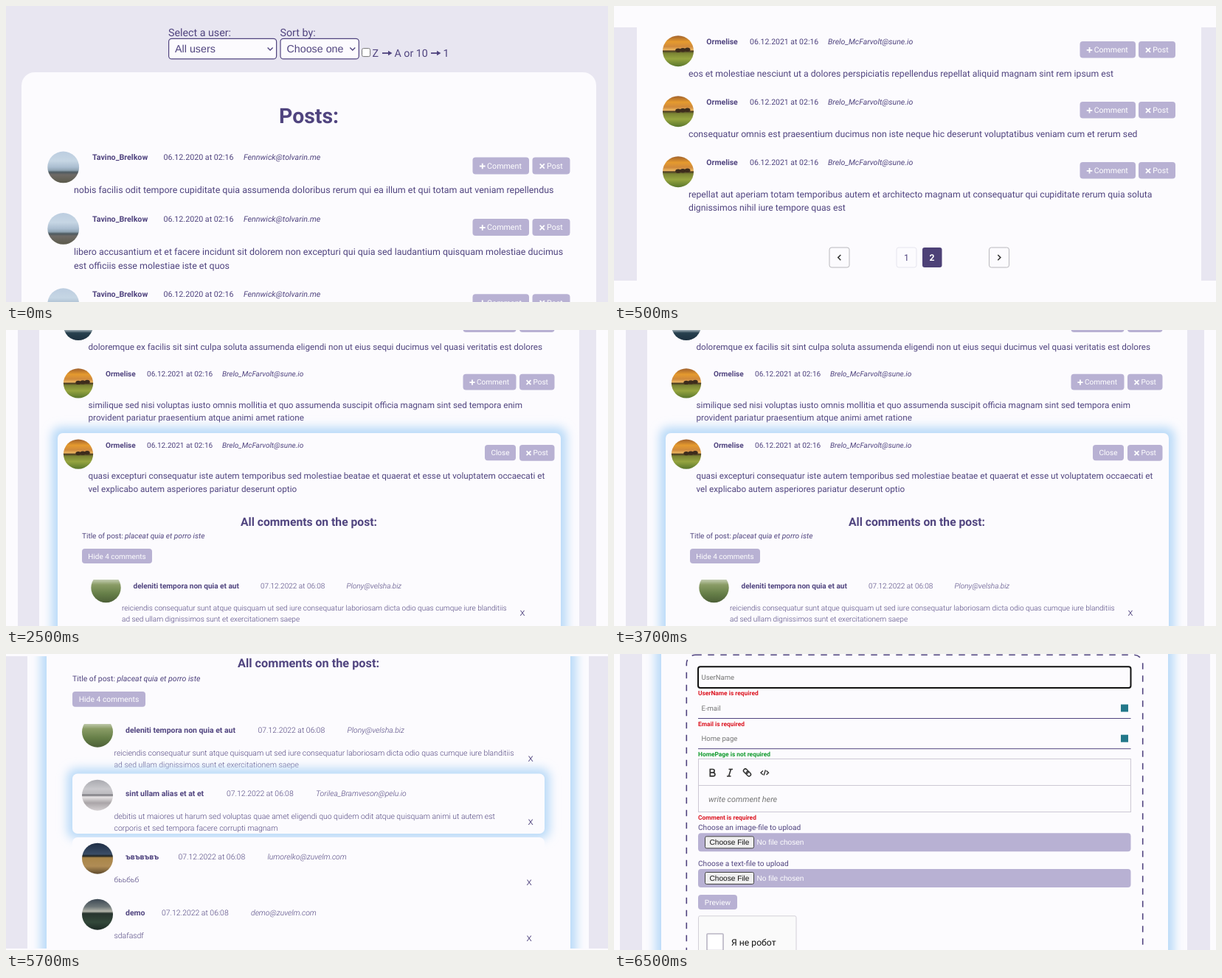
Animation, 816 px wide and 402 px high, one loop 8000 ms. Source, as an HTML page:

```html
<!DOCTYPE html>
<html lang="en">
<head>
<meta charset="utf-8">
<title>Posts and comments</title>
<style>
html, body { margin: 0; width: 100%; height: 100%; overflow: hidden; background: #fcfbfe; }
svg { display: block; width: 816px; height: 402px; }
text { font-family: Roboto, sans-serif; fill: #50447f; white-space: pre; text-rendering: geometricPrecision; }
.b { font-weight: 700; }
.i { font-style: italic; }
.l { font-weight: 300; }
.m { text-anchor: middle; }
.w { fill: #fff; }
.a { font-family: "Liberation Sans", Arial, sans-serif; }
.gray { fill: #757575; }
.red { fill: #dc1420; }
.green { fill: #0f9a2b; }
.black { fill: #111; }
</style>
</head>
<body>
<svg id="stage" viewBox="0 0 816 402">
  <defs>
    <filter id="blur" x="-20%" y="-50%" width="140%" height="200%"><feGaussianBlur stdDeviation="6.5"/></filter>
  </defs>
</svg>
<script>
const PANEL = '#fcfbfe', LILAC = '#e8e6f1', INK = '#50447f', BUTTON = '#b8b1d3', GLOW = '#b9daf8';
const stage = document.getElementById('stage');

const rect = (x, y, w, h, fill, r = 0, more = '') =>
  `<rect x="${x}" y="${y}" width="${w}" height="${h}" rx="${r}" fill="${fill}" ${more}/>`;
const box = (x, y, w, h, line, fill = PANEL, r = 3, sw = 1) =>
  rect(x, y, w, h, fill, r, `stroke="${line}" stroke-width="${sw}"`);
const text = (x, y, size, str, cls = '') =>
  `<text x="${x}" y="${y}" font-size="${size}" class="${cls}">${str}</text>`;
const path = (d, color = INK, sw = 1.5, fill = 'none') =>
  `<path d="${d}" stroke="${color}" stroke-width="${sw}" fill="${fill}"/>`;
const glowCard = (x, y, w, h, spread = 8) =>
  rect(x - spread, y - spread, w + 2 * spread, h + 2 * spread, GLOW, 12, 'filter="url(#blur)"') +
  rect(x, y, w, h, PANEL, 7);

// Avatars: soft landscapes as [offset, colour] stops
const scenery = {
  sky: [[0, '#bccde0'], [.3, '#c6d6e4'], [.5, '#aabdd0'], [.6, '#8fa3b2'], [.66, '#4d5a60'], [.74, '#6e6a66'], [1, '#5b5a4b']],
  sunset: [[0, '#a0602c'], [.2, '#e59a2e'], [.36, '#d08a3c'], [.46, '#ecb560'], [.5, '#4b3b22'], [.57, '#7b8434'], [.75, '#96a540'], [1, '#59762c']],
  snow: [[0, '#6fa3bd'], [.6, '#dfe8ec'], [.75, '#27404e'], [1, '#1d3140']],
  wheat: [[0, '#dfe6e2'], [.26, '#b9c4a4'], [.4, '#8a9c66'], [.7, '#667f48'], [1, '#4d6038']],
  shore: [[0, '#a9a9af'], [.3, '#c9c8cc'], [.45, '#bdbcc0'], [.5, '#77767c'], [.56, '#e6e3e4'], [.75, '#aaa5a8'], [1, '#d4d0d2']],
  harvest: [[0, '#1f2e46'], [.36, '#3a4d66'], [.42, '#1f2322'], [.48, '#a98649'], [.75, '#b08c55'], [1, '#5e4a2d']],
  dusk: [[0, '#3c4853'], [.25, '#6d7678'], [.4, '#b3b4aa'], [.47, '#28342f'], [.75, '#33483a'], [1, '#1d2b25']]
};
stage.querySelector('defs').innerHTML += Object.entries(scenery).map(([id, stops]) =>
  `<linearGradient id="${id}" x2="0" y2="1">${stops.map(([at, c]) =>
    `<stop offset="${at}" stop-color="${c}"/>`).join('')}</linearGradient>`).join('');

function avatar(kind, cx, cy, r) {
  let s = `<circle cx="${cx}" cy="${cy}" r="${r}" fill="url(#${kind})"/>`;
  if (kind === 'sunset') s += [0, .3, .6].map(k =>
    `<ellipse cx="${cx + r * k}" cy="${cy - 1 - r * k * .08}" rx="${r * .18}" ry="${r * .13}" fill="#3d2c1c"/>`).join('');
  return s;
}

function button(x, y, w, h, size, label, icon) {
  const by = y + h / 2 + size * .36, cx = x + size * 1.24, cy = y + h / 2 + .5, d = size * .36, e = d * .8;
  let s = rect(x, y, w, h, BUTTON, 4);
  if (!icon) return s + text(x + w / 2, by, size, label, 'm w');
  s += path(icon === '+' ? `M${cx - d} ${cy}h${2 * d}M${cx} ${cy - d}v${2 * d}`
    : `M${cx - e} ${cy - e}l${2 * e} ${2 * e}m0 ${-2 * e}l${-2 * e} ${2 * e}`, '#fff', 1.8);
  return s + text(x + size * 1.83, by, size, label, 'w');
}

// One post; k scales its type and buttons
function post(o, y, lines, closing) {
  const { k, kind, cx, nameX, dateX, mailX, bodyX, addX, delX, addW, delW } = o, size = 10.7 * k, h = 23 * k;
  return avatar(kind, cx, y + 13.4 * k, 21.4 * k) +
    text(nameX, y + 3.8 * k, size, o.name, 'b') + text(dateX, y + 3.8 * k, size, o.date) +
    text(mailX, y + 3.8 * k, size, o.mail, 'i') +
    (closing ? button(649, y, 42, h - .5, size, 'Close') : button(addX, y, addW, h, size, 'Comment', '+')) +
    button(delX, y, delW, h, size, 'Post', 'x') +
    lines.map((l, n) => text(bodyX, y + (48.8 + n * 18.7) * k, 12.45 * k, l)).join('');
}

const first = { k: 1, kind: 'sky', cx: 77.7, nameX: 117, dateX: 213.5, mailX: 322, bodyX: 92,
  addX: 632.5, addW: 76.5, delX: 713.5, delW: 51,
  name: 'Tavino_Brelkow', date: '06.12.2020 at 02:16', mail: 'Fennwick@tolvarin.me' };
const second = { k: .982, kind: 'sunset', cx: 87, nameX: 125.3, dateX: 184, mailX: 290, bodyX: 101,
  addX: 631.5, addW: 75.5, delX: 711, delW: 50,
  name: 'Ormelise', date: '06.12.2021 at 02:16', mail: 'Brelo_McFarvolt@sune.io' };
const third = { ...second, k: .941, cx: 98, nameX: 135, dateX: 191, mailX: 293, bodyX: 111.5,
  addX: 619.5, addW: 72, delX: 696, delW: 47.5 };

function comment(kind, y, name, dateX, mailX, mail, lines, endX = 711, drop = 38) {
  return avatar(kind, 124, y + 2.2, 21) + text(162, y + 3.7, 10.45, name, 'b') +
    text(dateX, y + 3.7, 10.45, '07.12.2022 at 06:08', 'l') + text(mailX, y + 3.7, 10.45, mail, 'i l') +
    lines.map((l, n) => text(146.5, y + 34 + n * 16, 10.45, l, 'l')).join('') +
    text(endX, y + drop + 4.5, 10.8, 'X', 'm a');
}

const opener = 'deleniti tempora non quia et aut';
const opening = ['reiciendis consequatur sunt atque quisquam ut sed iure consequatur laboriosam dicta odio quas cumque iure blanditiis',
  'ad sed ullam dignissimos sunt et exercitationem saepe'];
const arrow = x => path(`M${x} 64h9`, INK, 1.8) + path(`M${x + 8} 60.8l5.5 3.2l-5.5 3.2z`, 'none', 0, INK);
const select = (x, w, label) => box(x, 44.3, w, 27.6, INK, PANEL, 4, 1.2) + text(x + 8.5, 63.2, 14.28, label, 'a') +
  path(`M${x + w - 12} 56.5l3.5 3.5l3.5 -3.5`, INK, 1.3);

function listTop() {
  return rect(0, 0, 816, 402, LILAC) + rect(21, 90, 779, 340, PANEL, 18) +
    text(220, 40.5, 14.26, 'Select a user:') + text(371.5, 40.5, 14.26, 'Sort by:') +
    select(220.6, 146, 'All users') + select(372, 106.3, 'Choose one') +
    box(482.6, 57.6, 11, 11, '#767676', '#fff', 2) +
    text(496.5, 69, 14.26, 'Z') + arrow(510) + text(526.5, 69, 14.26, 'A or 10') + arrow(576) + text(592.5, 69, 14.26, '1') +
    text(410.5, 158.8, 28.4, 'Posts:', 'b m') +
    post(first, 205.5, ['nobis facilis odit tempore cupiditate quia assumenda doloribus rerum qui ea illum et qui totam aut veniam repellendus']) +
    post(first, 289, ['libero accusantium et et facere incidunt sit dolorem non excepturi qui quia sed laudantium quisquam molestiae ducimus',
      'est officiis esse molestiae iste et quos']) +
    post(first, 391.3, []);
}

function listEnd() {
  return rect(0, 0, 816, 402, PANEL) + rect(0, 29, 31, 344, LILAC) + rect(796, 29, 20, 344, LILAC) +
    post(second, 48, ['eos et molestiae nesciunt ut a dolores perspiciatis repellendus repellat aliquid magnam sint rem ipsum est']) +
    post(second, 130, ['consequatur omnis est praesentium ducimus non iste neque hic deserunt voluptatibus veniam cum et rerum sed']) +
    post(second, 212, ['repellat aut aperiam totam temporibus autem et architecto magnam ut consequatur qui cupiditate rerum quia soluta',
      'dignissimos nihil iure tempore quas est']) +
    box(292, 328, 27, 27, '#b9b8bd') + path('M307.3 338l-3.6 3.6l3.6 3.6', '#333') +
    box(383, 328, 27, 27, '#e6e5ee') + text(396.5, 346, 12.2, '1', 'm') +
    rect(418, 328, 26.5, 27, '#4d4177', 3) + text(431, 346, 12.2, '2', 'm w b') +
    box(508.5, 328, 27, 27, '#b9b8bd') + path('M520.3 338l3.6 3.6l-3.6 3.6', '#333');
}

function openPost() {
  return rect(0, 0, 816, 402, PANEL) + rect(16, 0, 29, 402, LILAC) + rect(777, 0, 23, 402, LILAC) +
    post({ ...third, kind: 'snow' }, -18.7,
      ['doloremque ex facilis sit sint culpa soluta assumenda eligendi non ut eius sequi ducimus vel quasi veritatis est dolores']) +
    post(third, 59.8, ['similique sed nisi voluptas iusto omnis mollitia et quo assumenda suscipit officia magnam sint sed tempora enim',
      'provident pariatur praesentium atque animi amet ratione']) +
    glowCard(70, 140, 682, 300) +
    post(third, 156, ['quasi excepturi consequatur iste autem temporibus sed molestiae beatae et quaerat et esse ut voluptatem occaecati et',
      'vel explicabo autem asperiores pariatur deserunt optio'], true) +
    text(410.5, 266, 15.7, 'All comments on the post:', 'b m') +
    text(103, 283.3, 10, 'Title of post:') + text(161, 283.3, 10.15, 'placeat quia et porro iste', 'i') +
    button(103, 297, 95, 20, 9.95, 'Hide 4 comments') +
    avatar('wheat', 135.5, 350, 20.2) + rect(110, 325, 50, 14, PANEL) +
    text(172.5, 351.2, 10.06, opener, 'b') +
    text(345, 351.2, 10.06, '07.12.2022 at 06:08', 'l') + text(461.5, 351.2, 10.06, 'Plony@velsha.biz', 'i l') +
    opening.map((l, n) => text(157, 381 + n * 15.2, 10.06, l, 'l')).join('') +
    text(700, 388.3, 10.4, 'X', 'm a');
}

function comments() {
  return rect(0, 0, 816, 402, LILAC) + rect(29, 0, 761, 402, PANEL) +
    glowCard(55, -30, 710, 480) +
    text(410, 18.3, 16.3, 'All comments on the post:', 'b m') +
    text(90, 36.8, 10.4, 'Title of post:') + text(150.5, 36.8, 10.55, 'placeat quia et porro iste', 'i') +
    button(90, 51, 99, 20.7, 10.35, 'Hide 4 comments') +
    comment('wheat', 103.5, opener, 341.5, 462.5, 'Plony@velsha.biz', opening) +
    rect(100, 80, 50, 15, PANEL) +
    glowCard(90, 162.5, 640, 81.5, 7) +
    comment('shore', 189.5, 'sint ullam alias et at et', 299, 420, 'Torilea_Bramveson@pelu.io',
      ['debitis ut maiores ut harum sed voluptas quae amet eligendi quo quidem odit atque quisquam animi ut autem est',
        'corporis et sed tempora facere corrupti magnam']) +
    rect(90, 249, 640, 76, PANEL, 7) +
    comment('harvest', 275.5, 'ъвъвъвъ', 233.5, 354.5, 'lumorelko@zuvelm.com', ['бььбьб'], 709, 33.5) +
    comment('dusk', 351.5, 'demo', 211, 332, 'demo@zuvelm.com', ['sdafasdf'], 709, 33.5) +
    rect(0, 0, 816, 3, PANEL) + rect(0, 400, 816, 2, PANEL);
}

const field = (y, label) => text(118.5, y, 9.5, label, 'gray') + path(`M114 ${y + 11}h586.5`, INK, 1) +
  rect(687, y - 8, 10, 10, '#23788a');
const upload = (y, label) => text(114, y - 4, 10.15, label) + rect(114, y, 586.5, 25, BUTTON, 4) +
  box(123.5, y + 4.5, 66, 16, '#444', '#efefef', 2) + text(156.5, y + 16.1, 10.1, 'Choose File', 'a m black') +
  text(193.5, y + 16.1, 10.1, 'No file chosen', 'a w');

function form() {
  return rect(0, 0, 816, 402, PANEL) + rect(8, 0, 30, 402, LILAC) + rect(777, 0, 31, 402, LILAC) +
    glowCard(64, -30, 687, 480) +
    rect(98.3, 1.3, 618.4, 440, 'none', 12, `stroke="${INK}" stroke-width="1.6" stroke-dasharray="8.5"`) +
    box(114, 17.2, 586.5, 28.8, '#111', PANEL, 3, 2) + text(118.5, 34.8, 9.5, 'UserName', 'gray') +
    text(114, 55.6, 8.4, 'UserName is required', 'b red') + field(76.5, 'E-mail') +
    text(114, 97.5, 8.4, 'Email is required', 'b red') + field(117.7, 'Home page') +
    text(114, 139.2, 8.4, 'HomePage is not required', 'b green') +
    box(114.5, 142.5, 586, 72, '#ccc8d4', PANEL, 0) + path('M114 178.5h586.5', '#ccc8d4', 1) +
    path('M130.3 156.5h3.5a2.2 2.2 0 0 1 0 4.6h-3.5zm0 4.6h4.2a2.3 2.3 0 0 1 0 4.8h-4.2z', '#333', 1.7) +
    path('M155.5 156.5h5.5M153 166h5.5M158.5 156.5l-3 9.5', '#333', 1.6) +
    `<g transform="rotate(45 180.5 161)">${box(174.5, 158.5, 7, 5, '#333', 'none', 2.5, 1.5)}${box(179.5, 158.5, 7, 5, '#333', 'none', 2.5, 1.5)}</g>` +
    path('M202 158.5l-3 2.7l3 2.7M206.5 158.5l3 2.7l-3 2.7M205.4 157.5l-2.3 7.2', '#333', 1.4) +
    text(128, 200.5, 10.8, 'write comment here', 'i gray') +
    text(114, 224.8, 8.4, 'Comment is required', 'b red') +
    upload(243.3, 'Choose an image-file to upload') + upload(292, 'Choose a text-file to upload') +
    button(114, 327, 53, 20, 10.1, 'Preview') +
    box(114.5, 355.8, 132.5, 60, '#d3d0d8', '#fafafa', 2) +
    box(126, 380, 22, 22.5, '#b9b5c4', '#fff', 1, 1.6) + text(159, 396.3, 12.2, 'Я не робот', 'black');
}

const starts = [0, 500, 2500, 4500, 6500];
const scenes = [listTop, listEnd, openPost, comments, form].map(draw => {
  const g = document.createElementNS('http://www.w3.org/2000/svg', 'g');
  g.innerHTML = draw();
  return stage.appendChild(g);
});

function tick() {
  const t = performance.now() % 8000;
  const now = starts.filter(s => s <= t).length - 1;
  scenes.forEach((g, n) => g.style.display = n === now ? '' : 'none');
  requestAnimationFrame(tick);
}
tick();
</script>
</body>
</html>
```
